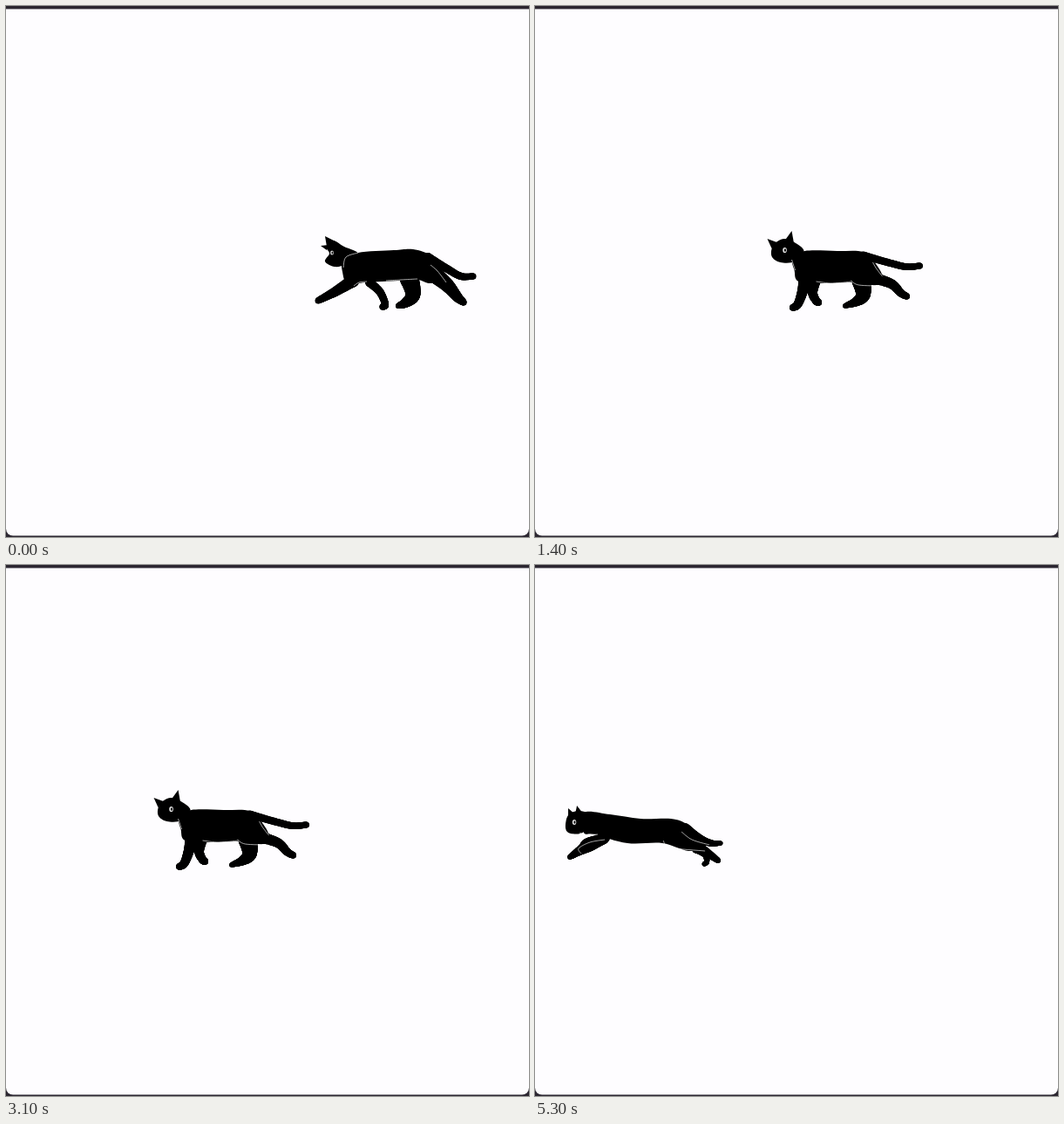
Write an HTML page with a canvas that moves like this. It is 600x609 px and loops after 5.4 s.

```html
<!DOCTYPE html>
<html lang="en">
<head>
<meta charset="utf-8">
<title>Running cat</title>
<style>
  html, body { margin: 0; width: 100%; height: 100%; overflow: hidden; background: #fefdff; }
  canvas { display: block; width: 600px; height: 609px; }
</style>
</head>
<body>
<canvas id="stage" width="600" height="609"></canvas>
<script>
const ctx = document.getElementById('stage').getContext('2d');
const LOOP = 5400, TICK = 100, STRIDE = 6.06;

// Smooth curve through flat x,y points.
function trace(pts, closed) {
  const n = pts.length / 2;
  const at = i => {
    i = closed ? (i + n) % n : Math.max(0, Math.min(n - 1, i));
    return [pts[2 * i], pts[2 * i + 1]];
  };
  ctx.beginPath();
  ctx.moveTo(...at(0));
  for (let i = 0; i < (closed ? n : n - 1); i++) {
    const [a, b, c, d] = [at(i - 1), at(i), at(i + 1), at(i + 2)];
    ctx.bezierCurveTo(
      b[0] + (c[0] - a[0]) / 6, b[1] + (c[1] - a[1]) / 6,
      c[0] - (d[0] - b[0]) / 6, c[1] - (d[1] - b[1]) / 6,
      c[0], c[1]);
  }
}

function blob(...pts) {
  trace(pts, true);
  ctx.fill();
}

function ear(ax, ay, bx, by, cx, cy) {
  ctx.beginPath();
  ctx.moveTo(ax, ay);
  ctx.lineTo(bx, by);
  ctx.lineTo(cx, cy);
  ctx.fill();
}

function dot(x, y, rx, ry = rx) {
  ctx.beginPath();
  ctx.ellipse(x, y, rx, ry, 0, 0, Math.PI * 2);
  ctx.fill();
}

// Tapered limb along a smooth curve, from width w0 to w1.
function limb(w0, w1, ...pts) {
  const n = pts.length / 2 - 1;
  const coord = (i, k) => pts[2 * Math.max(0, Math.min(n, i)) + k];
  const spline = (i, u, k) => {
    const [a, b, c, d] = [i - 1, i, i + 1, i + 2].map(j => coord(j, k));
    return b + u / 2 * (c - a + u * (2 * a - 5 * b + 4 * c - d + u * (3 * (b - c) + d - a)));
  };
  const count = n * 24;
  for (let j = 0; j <= count; j++) {
    const i = Math.min(n - 1, Math.floor(j / 24));
    const u = j / 24 - i;
    dot(spline(i, u, 0), spline(i, u, 1), (w0 + (w1 - w0) * j / count) / 2);
  }
}

function line(...pts) {
  trace(pts, false);
  ctx.stroke();
}

function eye(x, y, r) {
  ctx.fillStyle = '#e8e8e8';
  dot(x, y, r, r * 1.35);
  ctx.fillStyle = '#111';
  dot(x + 0.4, y, r * 0.5, r * 0.8);
}

// Each pose is drawn where the cat stands at the pose's own step.
function stretch() {
  blob(387,292, 404,283, 445,280, 467,279, 488,286, 498,298, 500,311, 487,318, 472,314,
    450,315, 412,317, 392,319, 386,305);
  blob(368,277, 375,269, 388,276, 404,284, 390,296, 377,299, 366,293, 371,284);
  ear(368,280, 361,275, 370,274);
  ear(368,276, 366,264, 378,270);
  limb(10, 7, 484,288, 507,302, 522,310, 536,310);
  limb(15, 7, 398,315, 377,328, 358,338);
  limb(10, 7, 417,317, 429,328, 435,342, 432,345);
  limb(22, 6, 463,313, 467,331, 459,340, 450,344);
  limb(20, 7, 489,306, 506,320, 518,334, 525,340);
  line(387,300, 390,288, 404,283);
  line(399,321, 405,317, 414,316);
  line(436,315, 453,314, 472,313);
  line(487,297, 495,304, 505,317);
  eye(374, 283, 1.9);
}

function stand() {
  blob(344,290, 358,281, 395,281, 425,282, 438,294, 447,310, 440,320, 412,317, 380,318,
    351,316, 346,303);
  blob(322,274, 334,267, 346,271, 357,281, 347,293, 330,294, 320,287);
  ear(320,278, 315,267, 326,271);
  ear(335,269, 343,258, 346,275);
  limb(9, 7, 425,286, 453,294, 474,299, 490,298);
  limb(15, 7, 358,310, 356,325, 350,342, 344,346);
  limb(13, 7, 371,312, 367,328, 371,338, 374,340);
  limb(22, 5, 423,315, 425,331, 417,339, 404,344);
  limb(13, 7, 441,313, 458,319, 468,329, 475,333);
  line(347,303, 345,297, 343,291);
  line(371,316, 390,318, 412,316);
  line(411,315, 420,320, 446,321);
  line(436,294, 440,301, 447,310);
  eye(335, 280, 2.3);
}

function leap() {
  blob(250,284, 280,286, 315,291, 350,291, 368,297, 382,309, 386,322, 370,328, 340,319,
    300,319, 262,309, 250,307);
  blob(232,287, 245,282, 258,288, 250,306, 235,308, 229,302);
  ear(232,290, 232,279, 240,286);
  ear(240,286, 242,276, 249,285);
  limb(12, 5, 366,302, 383,314, 396,319, 407,319);
  limb(10, 6, 275,313, 255,317, 247,324, 234,335);
  limb(9, 6, 274,315, 258,324, 246,329, 236,334);
  limb(14, 6, 372,317, 390,329, 404,339);
  limb(8, 5, 378,326, 389,332, 391,340, 388,343);
  line(247,331, 244,325, 257,318, 274,315);
  line(245,307, 251,309, 266,309);
  line(341,316, 349,324, 389,328);
  line(362,306, 374,315, 394,321);
  eye(239, 295, 2.2);
}

const gait = [
  { draw: leap, home: 20 },
  { draw: stretch, home: -1 },
  { draw: stand, home: 6 },
  { draw: stretch, home: -1 }
];

function drawCat(step) {
  const { draw, home } = gait[(step + 4) % 4];
  ctx.save();
  ctx.translate((home - step) * STRIDE, 0);
  ctx.fillStyle = '#000';
  ctx.strokeStyle = 'rgba(255,255,255,.8)';
  ctx.lineWidth = 0.8;
  draw();
  ctx.restore();
}

function drawWindow() {
  ctx.fillStyle = '#2b2630';
  ctx.fillRect(0, 0, 600, 609);
  ctx.fillStyle = '#fefdff';
  ctx.beginPath();
  ctx.roundRect(0, 3.5, 600, 604, [0, 0, 8, 8]);
  ctx.fill();
}

// The run skips a beat at the start and stalls briefly near ticks 17 and 19.
function stepAt(tick) {
  if (tick === 0) return -1;
  if (tick <= 16) return tick;
  if (tick === 17) return 16;
  if (tick <= 19) return 18;
  return tick - 1;
}

function frame() {
  const tick = Math.floor((performance.now() % LOOP) / TICK);
  drawWindow();
  drawCat(stepAt(tick));
  requestAnimationFrame(frame);
}
frame();
</script>
</body>
</html>
```
